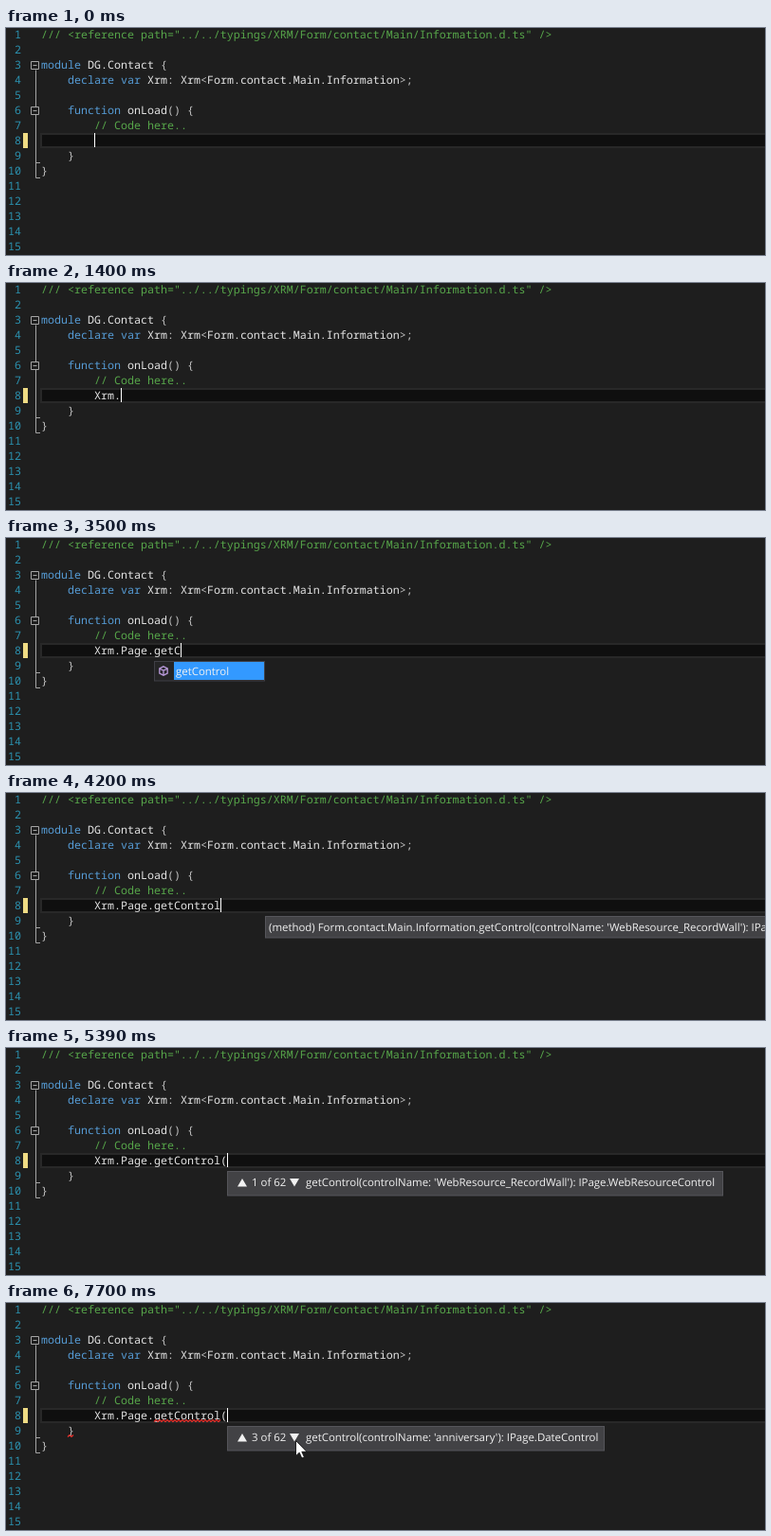
An HTML page for the animation above (8 s loop, 800 px wide and 240 px high).

```html
<!DOCTYPE html>
<html lang="en">
<head>
<meta charset="utf-8">
<title>Code completion</title>
<style>
  html, body { margin: 0; width: 100%; height: 100%; overflow: hidden; background: #1e1e1e; }
  svg { display: block; width: 800px; height: 240px; }
  text { white-space: pre; text-rendering: geometricPrecision; }
  .code { font: 11.667px "Noto Sans Mono", "DejaVu Sans Mono", monospace; fill: #e4e4e4; }
  .ui { font: 11.43px "Open Sans", "Noto Sans", sans-serif; fill: #f1f1f1; }
  .number { fill: #2b91af; text-anchor: end; }
  .comment { fill: #57a64a; }
  .keyword { fill: #569cd6; }
  .mark { fill: #c0c0c0; }
  .outline { fill: none; stroke: #a5a5a5; }
  .squiggle { fill: none; stroke: #f0322d; stroke-width: 1.1; }
</style>
</head>
<body>
<svg id="stage" viewBox="0 0 800 240">
  <defs>
    <g id="interface" fill="none" stroke="#75beff" stroke-width="1.6">
      <circle cx="-4.5" r="1.8"/><path d="M-2.7 0H1"/><circle cx="3.8" r="2.7"/>
    </g>
    <g id="namespace" fill="none" stroke="#d0d0d0" stroke-width="1.2">
      <path d="M-2.5-4.5Q-4.2-4.5-4.2-3V-1Q-4.2 0-5.4 0Q-4.2 0-4.2 1V3Q-4.2 4.5-2.5 4.5M2.5-4.5Q4.2-4.5 4.2-3V-1Q4.2 0 5.4 0Q4.2 0 4.2 1V3Q4.2 4.5 2.5 4.5"/>
    </g>
    <g id="property" fill="none" stroke="#d0d0d0">
      <path d="M-4.2 4.2L1-1" stroke-width="2.6" stroke-linecap="round"/>
      <path d="M2.2-4.6A3 3 0 1 0 5 -1.8L2.8-.6L.9-2.5Z" fill="#d0d0d0" stroke-width=".6"/>
    </g>
    <g id="method" fill="none" stroke="#b899d9" stroke-width="1.3">
      <path d="M0-4.7L4.2-2.5V2.5L0 4.7L-4.2 2.5V-2.5ZM-4.2-2.5L0-.3L4.2-2.5M0-.3V4.7"/>
    </g>
  </defs>
  <rect x="36" y="111" width="766" height="16" fill="#282828"/>
  <rect x="38" y="113" width="764" height="12" fill="#0f0f0f"/>
  <rect x="18" y="111" width="5" height="16" fill="#efdb84"/>
  <path class="outline" d="M31.5 44.5V158.5H36M31.5 142.5H36"/>
  <g class="outline" style="fill:#1e1e1e">
    <path d="M26.5 35.5h8v8h-8zM28.5 39.5h4M26.5 83.5h8v8h-8zM28.5 87.5h4"/>
  </g>
  <g id="lines"></g>
  <text id="typed" class="code" x="93" y="123"></text>
  <g id="errors" class="squiggle"></g>
  <g id="overlays"></g>
  <rect id="caret" y="111" width="1" height="15" fill="#fff"/>
  <path id="pointer" d="M0 0V16.2L3.7 12.7L6.3 18.6L8.9 17.4L6.3 11.8H11.5Z" fill="#fff" stroke="#111" stroke-width=".9"/>
</svg>
<script>
const LOOP = 8000, STEP = 70, COL = 7, ROW = 16, ITEM = 19;
const CODE_X = 37, TYPE_X = 93, POPUP_Y = 131;
const $ = id => document.getElementById(id);

function add(parent, tag, attrs, content) {
  const node = document.createElementNS('http://www.w3.org/2000/svg', tag);
  for (const key in attrs) node.setAttribute(key, attrs[key]);
  if (content !== undefined) node.textContent = content;
  return parent.appendChild(node);
}

// Each run is [class, text]; the first entry is the indent in columns.
const source = {
  1: [0, ['comment', '/// <reference path="../../typings/XRM/Form/contact/Main/Information.d.ts" />']],
  3: [0, ['keyword', 'module'], ['', ' DG.Contact '], ['mark', '{']],
  4: [4, ['keyword', 'declare var'], ['', ' Xrm'], ['mark', ':'], ['', ' Xrm'], ['mark', '<'],
      ['', 'Form.contact.Main.Information'], ['mark', '>;']],
  6: [4, ['keyword', 'function'], ['', ' onLoad'], ['mark', '() {']],
  7: [8, ['comment', '// Code here..']],
  9: [4, ['mark', '}']],
  10: [0, ['mark', '}']]
};

for (let n = 1; n <= 15; n++) {
  const y = 11 + ROW * (n - 1);
  add($('lines'), 'text', { class: 'code number', x: 16, y }, n);
  if (!source[n]) continue;
  const [indent, ...runs] = source[n];
  const line = add($('lines'), 'text', { class: 'code', x: CODE_X + indent * COL, y });
  for (const [kind, text] of runs) add(line, 'tspan', { class: kind }, text);
}

function squiggle(x, y, width) {
  let d = `M${x} ${y}`;
  for (let i = 2; i <= width; i += 2) d += `L${x + i} ${y + (i % 4 ? -2 : 0)}`;
  add($('errors'), 'path', { d });
}
squiggle(156, 125.5, 70);
squiggle(65, 141.5, 6);

const overlays = [];
function overlay(from, to) {
  const group = add($('overlays'), 'g', {});
  overlays.push({ group, from, to });
  return group;
}

function panel(group, x, right, height, fill, stroke) {
  add(group, 'rect', { x: x + .5, y: POPUP_Y - .5, width: right - x - 1, height, fill, stroke });
}

// Items are "icon label" strings; a wide list has a scroll column.
function popup(from, to, x, right, items, { selected = 0, chosen = true, wide = false } = {}) {
  const group = overlay(from, to);
  const height = items.length * ITEM + 1.5;
  const edge = right - (wide ? 18 : 1);
  panel(group, x, right, height, '#252526', '#3f3f46');
  if (wide) {
    add(group, 'rect', { x: edge, y: POPUP_Y, width: 17, height: height - 1, fill: '#3e3e42' });
    if (items.length > 1) {
      const bottom = POPUP_Y + height - 10;
      add(group, 'path', { fill: '#5d5558', d: `M${edge + 4} 143h9l-4.500-5zM${edge + 4} ${bottom - 3}h9l-4.500 5z` });
    }
  }
  items.forEach((item, i) => {
    const [icon, label] = item.split(' ');
    const top = POPUP_Y + i * ITEM;
    if (i === selected) {
      add(group, 'rect', chosen
        ? { x: x + 21, y: top, width: edge - x - 21, height: ITEM, fill: '#3399ff' }
        : { x: x + 21.5, y: top + .5, width: edge - x - 22, height: ITEM - 1, fill: 'none', stroke: '#8a8a8a' });
    }
    add(group, 'use', { href: '#' + icon, transform: `translate(${x + 10} ${top + 9.500})` });
    add(group, 'text', { class: 'ui', x: x + 23, y: top + 14 }, label);
  });
}

function signature(from, to, index, right, name, type) {
  const group = overlay(from, to);
  panel(group, 233, right, 25.5, '#424245', '#55555a');
  add(group, 'path', { fill: '#f1f1f1', d: 'M244 146.500h10l-5-8.500zM299 138h10l-5 8.500z' });
  add(group, 'text', { class: 'ui', x: 259, y: 146 }, index + ' of 62');
  add(group, 'text', { class: 'ui', x: 316, y: 146 }, `getControl(controlName: '${name}'): IPage.${type}Control`);
}

popup(770, 910, 93, 391, ['interface XMLDocument', 'interface XMLHttpRequest', 'interface XMLHttpRequestEventTarget',
  'interface XMLSerializer', 'interface XPathEvaluator', 'interface XPathExpression', 'namespace Xrm'], { wide: true });
popup(910, 980, 93, 391, ['interface DocumentIndexResult', 'interface FaxResult', 'interface MailboxResult',
  'namespace Xrm'], { selected: 3, wide: true });
popup(980, 1400, 93, 391, ['namespace Xrm'], { wide: true });
const root = ['property Page', 'property Utility'];
popup(1470, 1750, 121, 204, root, { chosen: false });
popup(1750, 2310, 121, 204, root);
const getters = ['method getAttribute', 'method getControl'];
popup(2730, 2940, 156, 273, ['property context', 'property data', ...getters, 'property ui'], { chosen: false });
popup(2940, 3500, 156, 273, getters);
popup(3500, 4200, 156, 273, ['method getControl']);

const hint = overlay(4200, 4270);
panel(hint, 273, 810, 22.5, '#424245', '#55555a');
add(hint, 'text', { class: 'ui', x: 277, y: 146 },
  "(method) Form.contact.Main.Information.getControl(controlName: 'WebResource_RecordWall'): IPage.WebResourceControl");

signature(4620, 6300, 1, 756, 'WebResource_RecordWall', 'WebResource');
signature(6300, 7630, 2, 690, 'address1_composite', 'String');
signature(7630, LOOP, 3, 631, 'anniversary', 'Date');

// Time at which the typed text reaches each length.
const finalText = 'Xrm.Page.getControl(';
const typing = [[630, 1], [840, 2], [980, 3], [1400, 4], [1750, 5], [2310, 8], [2660, 9],
  [2940, 10], [3010, 11], [3150, 12], [3500, 13], [4200, 19], [4550, 20]];
const caretToggles = [140, 770, 1120, 1400, 2030, 2310, 2520, 2730, 3920, 4200, 4410, 4620,
  4900, 5390, 5880, 6440, 6930, 7350, 7630, 7700];

function show(node, visible) {
  node.style.display = visible ? '' : 'none';
}

function render(t) {
  const length = typing.reduce((n, [at, count]) => t >= at ? count : n, 0);
  $('typed').textContent = finalText.slice(0, length);
  $('caret').setAttribute('x', TYPE_X + length * COL);
  show($('caret'), caretToggles.filter(at => t >= at).length % 2 === 0);
  for (const { group, from, to } of overlays) show(group, t >= from && t < to);
  show($('errors'), t >= 5530);

  show($('pointer'), t >= 5460);
  const p = Math.min(1, Math.max(0, (Math.floor(t / STEP) * STEP - 5460) / 700));
  const rest = (1 - p) ** 2 * (1 + 2 * p);
  $('pointer').setAttribute('transform', `translate(${305.5 + 10.5 * rest} ${145.5 + 72 * rest})`);
}

const start = performance.now();
function tick() {
  render((performance.now() - start) % LOOP);
  requestAnimationFrame(tick);
}
tick();
</script>
</body>
</html>
```
